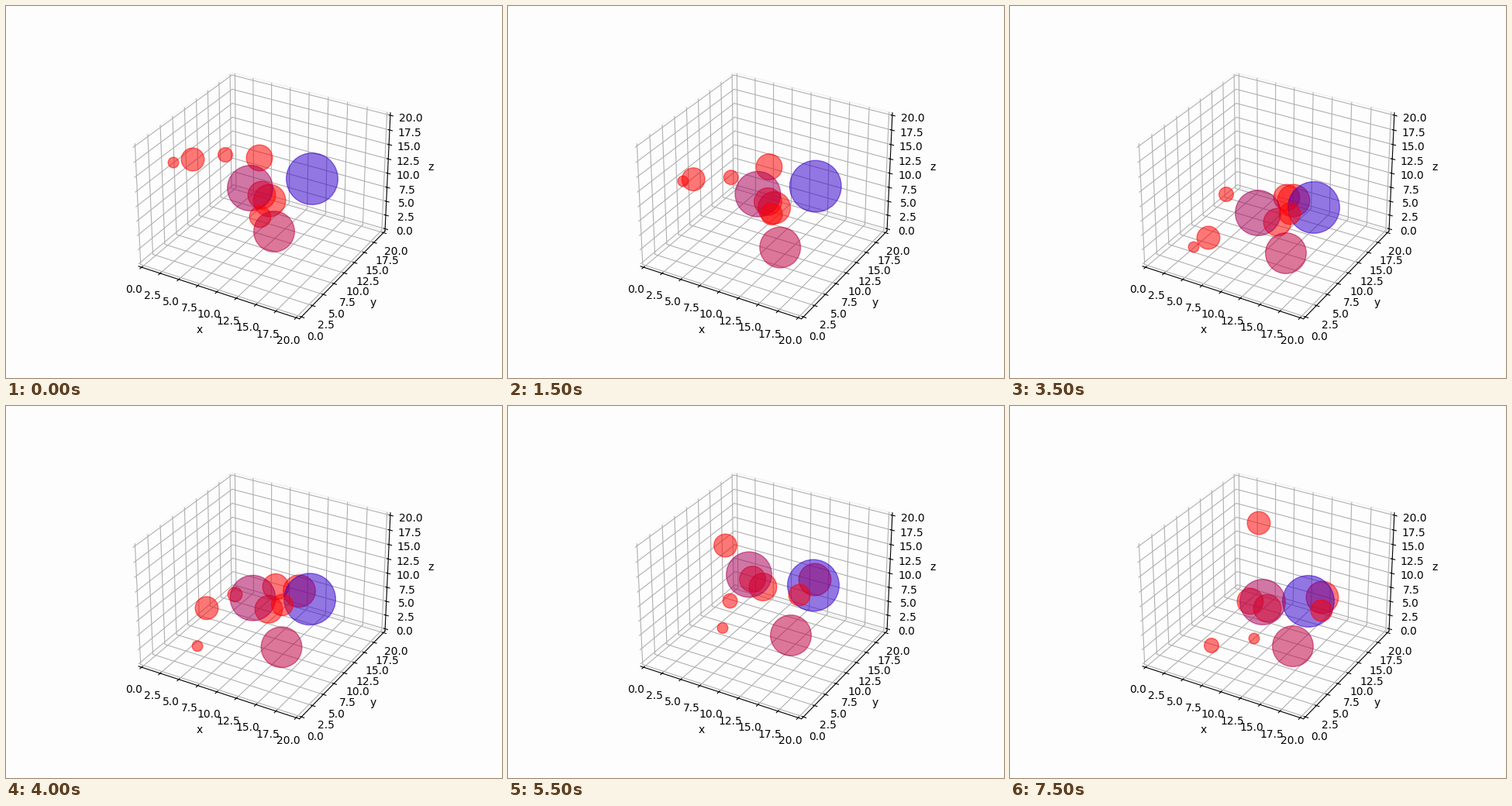
These frames come from a looping animation (640 px wide and 480 px high, 8000 ms). A matplotlib script:

```python
import numpy as np
import matplotlib.pyplot as plt
from matplotlib.animation import FuncAnimation

W, H, DPI = 640, 480, 100
STEP, FRAMES = 500, 16
GRAVITY = 4.5                    # px per step squared
BOUNCES = (0, 2, 7, 9, 13, 15)   # steps at which the balls change course
BG = "#fdfdfd"
EDGE = 1.0


class Ball:
    """Flies on a parabola from each bounce to the next."""

    def __init__(self, radius, xs, ys, blue=0):
        self.size = (2 * radius * 72 / DPI - EDGE) ** 2
        self.color = (1 - blue, 0, blue)
        self.xs, self.ys = xs, ys

    def at(self, step):
        i = min(np.searchsorted(BOUNCES, step, side="right"), len(BOUNCES) - 1)
        lift = GRAVITY / 2 * (step - BOUNCES[i - 1]) * (BOUNCES[i] - step)
        return (np.interp(step, BOUNCES, self.xs),
                np.interp(step, BOUNCES, self.ys) - lift)


# Back to front.
balls = [
    Ball(17.5, (327, 332, 357, 339, 292, 310), (196, 209, 247, 224, 241, 252)),
    Ball(21.5, (340, 338, 366, 391, 401, 403), (251, 274, 251, 231, 235, 247)),
    Ball(34, (395, 398, 392, 392, 396, 385), (223, 237, 260, 243, 238, 252), blue=.8),
    Ball(18.5, (330, 333, 345, 333, 325, 332), (244, 257, 279, 250, 235, 261)),
    Ball(10, (283, 290, 279, 312, 261, 260), (192, 227, 243, 248, 273, 309)),
    Ball(30, (315, 323, 320, 317, 305, 326), (235, 248, 267, 233, 220, 253), blue=.34),
    Ball(14.5, (328, 335, 361, 352, 400, 402), (272, 280, 268, 250, 256, 264)),
    Ball(15.5, (241, 235, 256, 262, 299, 321), (198, 216, 299, 227, 151, 151)),
    Ball(7.5, (216, 223, 237, 257, 297, 315), (202, 216, 311, 313, 278, 300)),
    Ball(27, (346, 350, 356, 355, 375, 365), (291, 321, 319, 308, 302, 310), blue=.25),
]

fig = plt.figure(figsize=(W / DPI, H / DPI), dpi=DPI, facecolor=BG)
fig.subplots_adjust(bottom=.1105, top=.8805)
box = fig.add_subplot(projection="3d", facecolor=BG)
pad = 20 / 48
span = (-pad, 20 + pad)
box.set(xlim=span, ylim=span, zlim=span, xlabel="x", ylabel="y", zlabel="z")
for axis in (box.xaxis, box.yaxis, box.zaxis):
    axis.pane.set_facecolor(BG)

stage = fig.add_axes((0, 0, 1, 1), xlim=(0, W), ylim=(H, 0))
stage.axis("off")
dots = stage.scatter([0] * len(balls), [0] * len(balls),
                     s=[b.size for b in balls], c=[b.color for b in balls],
                     alpha=.53, linewidths=EDGE)


def draw(step):
    dots.set_offsets([b.at(step) for b in balls])
    return dots,


anim = FuncAnimation(fig, draw, frames=FRAMES, interval=STEP, repeat=True)
plt.show()
```
